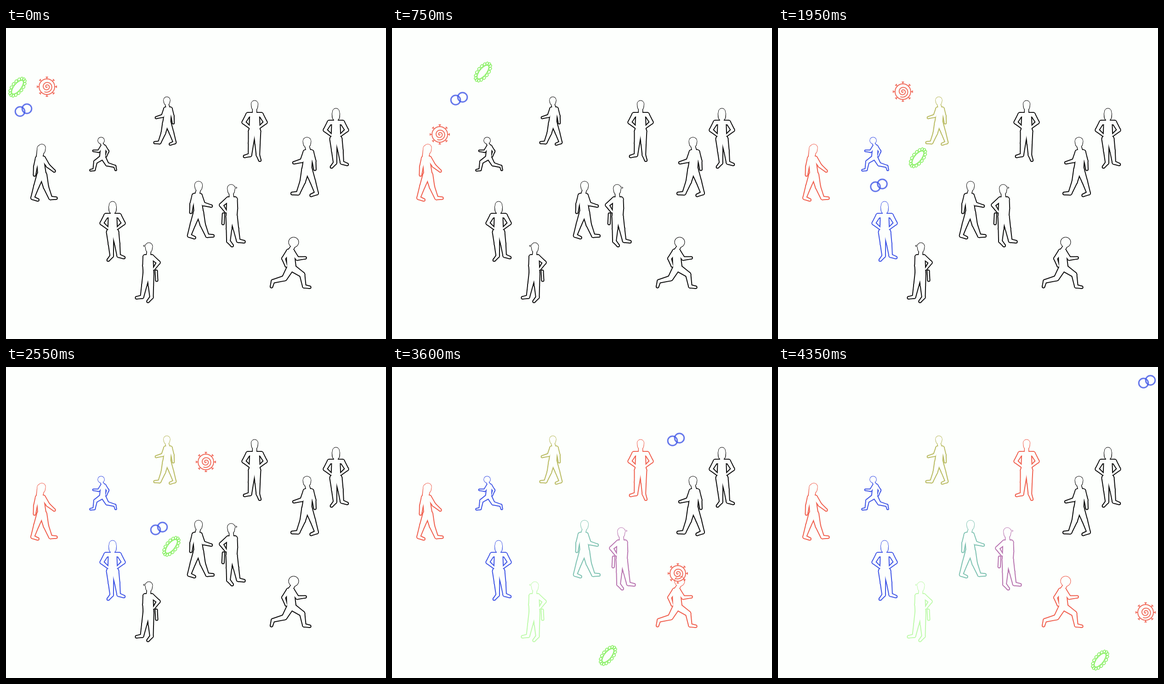
Recreate the animation shown at these times as an HTML page with a canvas. Size 827 px wide and 678 px high, loop 4500 ms.

```html
<!DOCTYPE html>
<html lang="en">
<head>
<meta charset="utf-8">
<title>Passing it on</title>
<style>
  html, body { margin: 0; width: 100%; height: 100%; overflow: hidden; background: #fdfffd; }
  canvas { display: block; width: 100%; height: 100%; }
</style>
</head>
<body>
<canvas id="stage" width="827" height="678"></canvas>
<script>
const ctx = document.getElementById('stage').getContext('2d');
const STEP = 150, STEPS = 30, TAU = 2 * Math.PI;
const PAPER = '#fdfffd', BLACK = '#0c0c0c', RED = '#f0604f', GREEN = '#8cf068', BLUE = '#4056e6';

// Body proportions; heights run down from the top of the head.
const SHOULDER_Y = 31, HIP_Y = 67;
const ARM = { lengths: [19, 17.5], radii: [5, 4, 2.6] };
const LEG = { lengths: [26, 26, 12], radii: [8, 5.8, 3.8, 2.8] };

// Limb angles in degrees, joint by joint: 0 hangs down, 90 points forward.
const WALK = {
  head: 8.5, build: 9, chest: -3, hips: 0, shoulder: 6, hip: 3,
  arms: [[22, 75], [-17, -6]], legs: [[13, 22, 88], [-20, -18, 68]]
};
const STROLL = { ...WALK, head: 8, build: 8, arms: [[33, 50], [-15, -6]], extra: [[-3, 9, 7], [-8, 27, 4]] };
const RUN = {
  head: 11, build: 9, chest: -7, hips: -5, shoulder: 4, hip: 2,
  arms: [[35, 95], [-35, 20]], legs: [[56, 10, 80], [-30, -75, -15]]
};
const GUARD = {
  head: 8, build: 10.5, chest: 1, hips: 1, shoulder: 7, hip: 4,
  arms: [[5, 0], [-50, 35]], legs: [[11, 11, 80], [-3, -3, 40]],
  extra: [[4, 7, 1.5], [11, 7, 1]], holster: [[-16, 62, 2.5], [-17, 82, 2.5]]
};
const AKIMBO = {
  head: 7.5, build: 11, chest: 0, hips: 0, shoulder: 14, hip: 5.5,
  arms: [[30, -50], [-30, 50]], legs: [[2, 2, 20], [-5, -5, -75]]
};
const LADY = { ...AKIMBO, build: 9.5, legs: [[10, 7, 70], [4, 4, -40]], extra: [[0, 12, 8.5], [0, 19, 8]] };

// x, y: top of the head; hit: the step at which the colour is caught
const PEOPLE = [
  { pose: STROLL, x: 78, y: 253, size: 1.01, hit: 5, color: RED },
  { pose: RUN, x: 207, y: 238, size: .66, left: true, hit: 9, color: BLUE },
  { pose: WALK, x: 350, y: 150, size: .855, left: true, hit: 12, color: '#b9bb62' },
  { pose: LADY, x: 232, y: 378, size: 1, hit: 13, color: BLUE },
  { pose: WALK, x: 419, y: 334, size: 1.02, hit: 18, color: '#7fc2b2' },
  { pose: AKIMBO, x: 541, y: 158, size: 1, hit: 19, color: RED },
  { pose: GUARD, x: 490, y: 341, size: 1.04, hit: 20, color: '#b874b0', push: 9 },
  { pose: GUARD, x: 311, y: 468, size: 1, left: true, hit: 20, color: '#bffaac' },
  { pose: RUN, x: 626, y: 456, size: 1, hit: 24, color: RED },
  { pose: WALK, x: 655, y: 238, size: 1.05, left: true },
  { pose: LADY, x: 718, y: 175, size: 1 }
];

// Straight flights between bounces: step, x, y
const GERMS = [
  { draw: drawCapsule, path: [[0, 25, 129], [5, 198, 96], [7, 233, 118], [10, 263, 202], [17, 360, 391], [21, 353, 503], [24, 470, 629], [29, 701, 639]] },
  { draw: drawRings, path: [[0, 38, 179], [5, 146, 154], [10, 158, 277], [14, 240, 365], [17, 333, 352], [21, 505, 286], [24, 618, 158], [28, 801, 21], [29, 803, 32]] },
  { draw: drawSpiral, path: [[0, 89, 128], [5, 104, 232], [10, 157, 171], [14, 310, 128], [17, 435, 207], [21, 542, 362], [24, 622, 450], [29, 800, 535]] }
];

// Joints of a limb as [x, y, radius], from its root outward.
function limb({ lengths, radii }, angles, x, y) {
  const joints = [[x, y, radii[0]]];
  angles.forEach((deg, i) => {
    const a = deg * TAU / 360;
    x += lengths[i] * Math.sin(a);
    y += lengths[i] * Math.cos(a);
    joints.push([x, y, radii[i + 1]]);
  });
  return joints;
}

function skeleton(p) {
  const side = i => 1 - 2 * i;
  const { chest, hips, shoulder, build } = p;
  return [
    [[0, p.head, p.head], [0, 22 - p.head, p.head * .9]],
    [[0, 18, 4.5], [chest, SHOULDER_Y - 2, 5]],
    [[chest - shoulder, SHOULDER_Y, 5], [chest + shoulder, SHOULDER_Y, 5]],
    [[chest, 37, build], [hips, HIP_Y - 3, build + 1]],
    ...p.arms.map((angles, i) => limb(ARM, angles, chest + side(i) * shoulder, SHOULDER_Y)),
    ...p.legs.map((angles, i) => limb(LEG, angles, hips + side(i) * p.hip, HIP_Y)),
    ...[p.extra, p.holster].filter(Boolean)
  ];
}

// Tapered bone between two round joints.
function bone([x0, y0, r0], [x1, y1, r1]) {
  const a = Math.atan2(y1 - y0, x1 - x0) + TAU / 4;
  const c = Math.cos(a), s = Math.sin(a);
  ctx.beginPath();
  ctx.moveTo(x0 + r0 * c, y0 + r0 * s);
  ctx.lineTo(x1 + r1 * c, y1 + r1 * s);
  ctx.lineTo(x1 - r1 * c, y1 - r1 * s);
  ctx.lineTo(x0 - r0 * c, y0 - r0 * s);
  ctx.fill();
  for (const [x, y, r] of [[x0, y0, r0], [x1, y1, r1]]) {
    ctx.beginPath();
    ctx.arc(x, y, r, 0, TAU);
    ctx.fill();
  }
}

// An ink body with a slightly slimmer paper body on top leaves the outline.
function drawPerson(person, step) {
  const hit = step >= person.hit, push = hit && person.push || 0;
  const bones = skeleton(person.pose);
  ctx.save();
  ctx.translate(person.x + push, person.y + push);
  ctx.scale(person.left ? -person.size : person.size, person.size);
  for (const sign of [1, -1]) {
    ctx.fillStyle = sign < 0 ? PAPER : hit ? person.color : BLACK;
    // the line is thinnest at the head
    const ink = ([x, y, r]) => [x, y, Math.max(0, r + sign * Math.min(1, .3 + y / 50) / person.size)];
    for (const joints of bones)
      for (let i = 1; i < joints.length; i++) bone(ink(joints[i - 1]), ink(joints[i]));
  }
  ctx.restore();
}

function line(color, width) {
  ctx.strokeStyle = color;
  ctx.lineWidth = width;
}

function ring(x, y, rx, ry = rx) {
  ctx.beginPath();
  ctx.ellipse(x, y, rx, ry, 0, 0, TAU);
  ctx.stroke();
}

function drawCapsule() {
  line(GREEN, 1.6);
  ctx.rotate(-.9);
  ring(0, 0, 18, 7.5);
  for (let a = 0; a < TAU - .01; a += TAU / 16)
    ring(22 * Math.cos(a), 11 * Math.sin(a), 3.3, 2.7);
}

function drawRings() {
  line(BLUE, 3);
  ctx.globalAlpha = .8;
  for (const side of [-1, 1]) ring(7.5 * side, -3 * side, 10.3);
}

function drawSpiral() {
  line(RED, 2);
  ctx.globalAlpha = .9;
  ring(0, 0, 17);
  ctx.beginPath();
  for (let a = 0; a < 2.35 * TAU; a += .2) ctx.lineTo(a * .85 * Math.cos(a), a * .85 * Math.sin(a));
  ctx.stroke();
  for (let i = 0; i < 8; i++) {
    ctx.beginPath();
    ctx.moveTo(0, -17);
    ctx.lineTo(0, -20);
    ctx.moveTo(-2.5, -21);
    ctx.lineTo(2.5, -21);
    ctx.stroke();
    ctx.rotate(TAU / 8);
  }
}

function place(path, step) {
  const i = Math.max(1, path.findIndex(p => p[0] >= step));
  const [s0, x0, y0] = path[i - 1], [s1, x1, y1] = path[i];
  const k = (step - s0) / (s1 - s0);
  return [x0 + (x1 - x0) * k, y0 + (y1 - y0) * k];
}

function render(step) {
  ctx.fillStyle = PAPER;
  ctx.fillRect(0, 0, 827, 678);
  for (const person of PEOPLE) drawPerson(person, step);
  for (const germ of GERMS) {
    ctx.save();
    ctx.translate(...place(germ.path, step));
    germ.draw();
    ctx.restore();
  }
}

let start, shown;
function tick(now) {
  start ??= now;
  const step = Math.floor((now - start) / STEP) % STEPS;
  if (step !== shown) render(shown = step);
  requestAnimationFrame(tick);
}
render(0);
requestAnimationFrame(tick);
</script>
</body>
</html>
```
